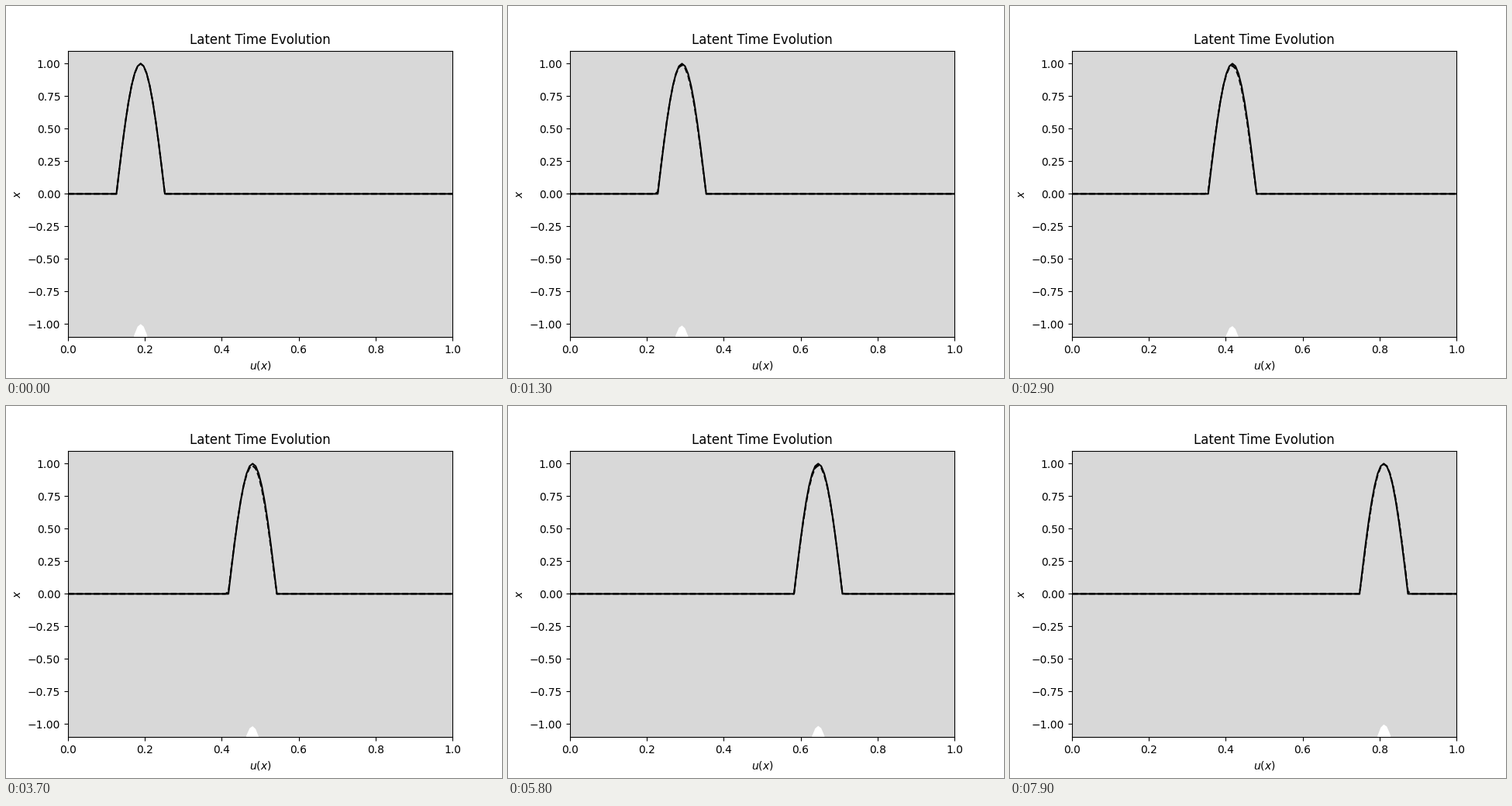
These frames come from a looping animation (640 by 480 pixels, 8000 ms). A matplotlib script:

```python
import numpy as np
import matplotlib.pyplot as plt
from matplotlib.animation import FuncAnimation

FRAMES = 80
CELLS = 127          # grid intervals across the domain
START, HALF = 24, 8  # first peak cell and half width of the pulse

cells = np.arange(CELLS + 1)
x = cells / CELLS


def pulse(center, amp=1.0):
    d = (cells - center) / HALF
    return np.where(np.abs(d) < 1, amp * np.cos(np.pi / 2 * d), 0.0)


def predict(i):
    """The pulse, slightly damped, lagging at first and leading later."""
    t = i / FRAMES
    amp = 1 - 0.016 * np.sqrt(np.sin(np.pi * t))
    shift = -0.1 * np.sin(1.5 * np.pi * t)
    return pulse(START + i + shift, amp)


fig, ax = plt.subplots(figsize=(6.4, 4.8), dpi=100)
ax.set(xlim=(0, 1), ylim=(-1.1, 1.1), title="Latent Time Evolution",
       xlabel="$u(x)$", ylabel="$x$")
band = ax.fill_between(x, -2, 2, facecolor="#d8d8d8", linewidth=0)
truth, = ax.plot(x, pulse(START), "k-")
guess, = ax.plot(x, predict(0), "k--")


def update(i):
    mean = predict(i)
    truth.set_ydata(pulse(START + i))
    guess.set_ydata(mean)
    lower = np.column_stack([x, mean - 2])
    upper = np.column_stack([x, mean + 2])
    band.set_verts([np.concatenate([lower, upper[::-1]])])
    return band, truth, guess


anim = FuncAnimation(fig, update, frames=FRAMES, interval=100,
                     repeat=True, repeat_delay=0, blit=False)
plt.show()
```
